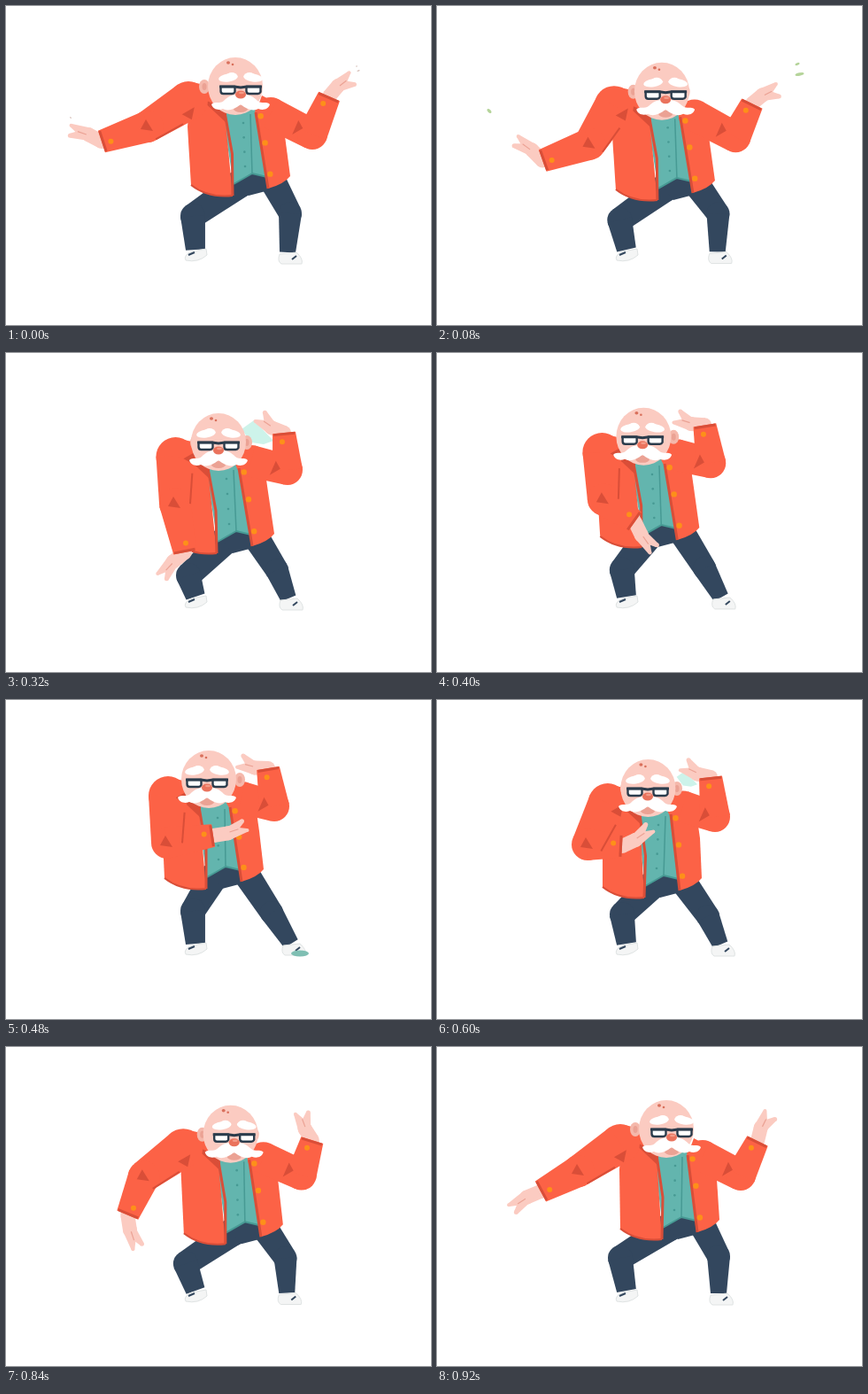
These frames come from a looping animation (480 px wide and 360 px high, 0.96 s). An HTML page with a canvas:

```html
<!DOCTYPE html>
<html lang="en">
<head>
<meta charset="utf-8">
<title>Dancing man</title>
<style>
html, body { margin: 0; width: 100%; height: 100%; overflow: hidden; background: #fff; }
canvas { display: block; }
</style>
</head>
<body>
<canvas id="stage" width="480" height="360"></canvas>
<script>
const ctx = document.getElementById('stage').getContext('2d');
const LOOP = 960, STEP = 40;
const KEY_TIMES = [0, 160, 320, 480, 600, 760, 920];
const RED = '#fc6246', DARK_RED = '#d94e38', SKIN = '#fbcbc1', BLUSH = '#eba294';
const VEST = '#63b5ae', DARK_VEST = '#479a94', NAVY = '#33475e', BUTTON = '#fd9019';

// Pose of each joint at every key time
const tracks = {
  face: [[265, 108], [251, 119], [240, 118], [227, 107], [238, 117], [250, 120], [265, 110]],
  turn: [[1], [.1], [-.5], [-1], [-.6], [0], [1]],
  collar: [[247, 120], [233, 130], [228, 130], [218, 121], [229, 129], [232, 131], [248, 122]],
  hem: [[256, 214], [242, 224], [238, 226], [226, 213], [234, 223], [242, 226], [254, 217]],
  elbowL: [[160, 136], [184, 173], [191, 170], [182, 161], [170, 163], [154, 152], [160, 140]],
  cuffL: [[108, 153], [138, 198], [202, 225], [234, 153], [209, 165], [159, 206], [117, 163]],
  aimL: [[208], [221], [142], [-9], [-25], [20], [157]],
  elbowR: [[346, 145], [328, 149], [318, 132], [303, 120], [314, 132], [325, 143], [343, 145]],
  cuffR: [[365, 102], [344, 115], [314, 90], [296, 77], [309, 87], [330, 102], [362, 106]],
  aimR: [[-50], [-48], [-158], [-178], [-167], [-159], [-76]],
  kneeL: [[211, 237], [202, 246], [206, 251], [211, 238], [209, 242], [201, 249], [207, 238]],
  kneeR: [[321, 234], [313, 236], [306, 245], [300, 240], [306, 244], [313, 240], [318, 236]],
  footR: [[318, 278], [316, 277], [319, 277], [322, 275], [320, 276], [317, 277], [318, 278]]
};

// Smooth periodic spline through the key poses
function sample(keys, t) {
  const n = keys.length;
  const time = i => KEY_TIMES[(i + n) % n] + LOOP * Math.floor(i / n);
  const key = i => keys[(i + n) % n];
  let i = n - 1;
  while (KEY_TIMES[i] > t) i--;
  const span = time(i + 1) - time(i), u = (t - time(i)) / span;
  return key(i).map((a, k) => {
    const b = key(i + 1)[k];
    const slope = j => (key(j + 1)[k] - key(j - 1)[k]) / (time(j + 1) - time(j - 1)) * span;
    return a + u * (slope(i) + u * (3 * (b - a) - 2 * slope(i) - slope(i + 1)
      + u * (2 * (a - b) + slope(i) + slope(i + 1))));
  });
}

const add = (p, x, y) => [p[0] + x, p[1] + y];
const mix = (a, b, u) => [a[0] + (b[0] - a[0]) * u, a[1] + (b[1] - a[1]) * u];
const polar = (p, deg, r) => add(p, r * Math.cos(deg * Math.PI / 180), r * Math.sin(deg * Math.PI / 180));
const heading = (a, b) => Math.atan2(b[1] - a[1], b[0] - a[0]) * 180 / Math.PI;

function fill(color, path) {
  ctx.fillStyle = color;
  ctx.fill(new Path2D(path));
}
function stroke(color, width, path) {
  ctx.strokeStyle = color;
  ctx.lineWidth = width;
  ctx.stroke(new Path2D(path));
}
function oval(color, p, rx, ry = rx, angle = 0) {
  ctx.fillStyle = color;
  ctx.beginPath();
  ctx.ellipse(p[0], p[1], rx, ry, angle, 0, 7);
  ctx.fill();
}
const poly = (color, ...points) => fill(color, 'M' + points.join('L') + 'Z');
const line = (color, width, ...points) => stroke(color, width, 'M' + points.join('L'));

// Tapered segments with round joints
function limb(color, points, radii, roundEnd) {
  points.forEach((p, i) => {
    const last = i === points.length - 1;
    if (!last || roundEnd) oval(color, p, radii[i]);
    if (last) return;
    const q = points[i + 1], side = heading(p, q) + 90;
    poly(color, polar(p, side, radii[i]), polar(q, side, radii[i + 1]),
      polar(q, side, -radii[i + 1]), polar(p, side, -radii[i]));
  });
}

function hand(wrist, aim, length, spread) {
  const palm = polar(wrist, aim, length * .42);
  limb(SKIN, [palm, polar(palm, aim + spread, length * .5)], [7, 2.5], true);
  limb(SKIN, [wrist, palm, polar(wrist, aim, length - 2)], [8, 8, 2], true);
  line(BLUSH, 1.2, polar(palm, aim + spread, 2), polar(palm, aim + spread * .4, length * .3));
}

function sleeve(shoulder, elbow, cuff, radii) {
  limb(RED, [shoulder, elbow, cuff], radii);
  const along = heading(elbow, cuff);
  const edge = polar(cuff, along, -1.5);
  line(DARK_RED, 3, polar(edge, along + 90, 12), polar(edge, along - 90, 12));
  oval(BUTTON, polar(polar(cuff, along, -10), along - 90, 3), 3);
}

function legs(p) {
  const hemR = add(p.hem, 40, -8);
  limb(NAVY, [add(hemR, 5, -9), p.kneeR, p.footR], [15, 13, 9]);
  limb(NAVY, [add(p.hem, 9, -14), p.kneeL, [214, 275]], [16, 14, 11]);
  poly(NAVY, add(p.hem, 0, -22), add(hemR, 0, -20), add(hemR, 1, 2), add(p.hem, 18, 0));
  const left = 'M226 274L210 277Q200 281 203 287Q217 290 227 281Z';
  fill('#f4f5f5', left);
  stroke('#dfe3e3', 1, left);
  line(NAVY, 2, [206, 281], [213, 278]);
  ctx.save();
  ctx.translate(p.footR[0] - 318, p.footR[1] - 278);
  const right = 'M309 280L328 278Q336 285 334 291L311 291Q306 288 309 280Z';
  fill('#f4f5f5', right);
  stroke('#dfe3e3', 1, right);
  line(NAVY, 2, [323, 286], [328, 282]);
  ctx.restore();
}

function torso(p) {
  const { collar, hem } = p;
  const collarR = add(collar, 35, 0), hemR = add(hem, 40, -8);
  const notch = add(hem, 22, -25);
  poly(VEST, add(collar, -4, -8), add(collarR, 4, -8), add(hemR, -1, -13), notch, add(hem, 1, -13));
  line(DARK_VEST, 1.5, add(collar, 29, 2), notch);
  line(DARK_VEST, 2, add(hem, 1, -13), notch, add(hemR, -1, -13));
  for (let i = 0; i < 4; i++) oval(DARK_VEST, mix(add(collar, 21, 12), add(notch, -8, -8), i / 3), 1.3);

  const outerL = add(hem, -47, -12);
  fill(RED, `M${collar}L${add(collar, -8, -28)}L${add(collar, -37, -34)}L${add(collar, -42, 16)}
    L${outerL}Q${add(hem, -28, 3)} ${hem}Z`);
  poly(DARK_RED, add(collar, -28, -16), add(collar, 2, -4), add(collar, 2, 12));
  line(DARK_RED, 3, collar, mix(add(collar, 6, 0), add(hem, 2, 0), .5), hem);
  stroke(DARK_RED, 2, `M${outerL}Q${add(hem, -28, 3)} ${hem}`);

  const outerR = add(hem, 65, -22);
  fill(RED, `M${collarR}L${add(collarR, 7, -19)}L${add(collarR, 28, -8)}L${add(collarR, 33, 27)}
    L${outerR}Q${add(hem, 58, -13)} ${hemR}Z`);
}

function arms(p) {
  const collarR = add(p.collar, 35, 0), hemR = add(p.hem, 40, -8);
  const shoulderR = add(p.collar, 50 + 2 * p.turn, -5 + 6 * p.turn);
  hand(p.cuffR, p.aimR, 37, 45);
  sleeve(shoulderR, p.elbowR, p.cuffR, [18, 17, 13]);
  const crease = mix(p.elbowR, shoulderR, .42);
  poly(DARK_RED, add(crease, -3, 10), add(crease, 4, -6), add(crease, 9, 3));
  line(DARK_RED, 3, collarR, hemR);
  for (const u of [.05, .4, .81]) oval(BUTTON, add(mix(collarR, hemR, u), 5, 0), 3.2);

  const shoulderL = add(p.collar, -38 - 3 * p.turn, -13);
  hand(p.cuffL, p.aimL, 41, -32);
  sleeve(shoulderL, p.elbowL, p.cuffL, [22, 18, 13]);
  const side = heading(shoulderL, p.elbowL) - 90;
  line(DARK_RED, 2, polar(mix(shoulderL, p.elbowL, .35), side, 19), polar(p.elbowL, side, 17));
  const pit = polar(mix(shoulderL, p.elbowL, .15), side, 20);
  poly(DARK_RED, pit, add(pit, 3, -14), add(pit, -11, -6));
  poly(DARK_RED, add(p.elbowL, -8, 3), add(p.elbowL, -2, -8), add(p.elbowL, 6, 5));
}

function head(p) {
  ctx.save();
  ctx.translate(...p.face);
  const cx = -2 - 4 * p.turn;
  for (const side of [-1, 1]) {
    const ear = [cx + side * 29 - 6 * p.turn, -17];
    oval('#f5b8ab', ear, 6, 8);
    oval(BLUSH, ear, 2.5, 4);
  }
  oval(SKIN, [cx, -17.5], 31, 32.5);
  oval('#d9705c', [cx - 8, -44], 2, 1.7);
  oval('#d9705c', [cx - 3, -42], 1.3);
  oval(BLUSH, [0, 8], 8, 4);
  for (const side of [-1, 1]) {
    oval('#fff', [side * 14, -27], 11, 4.5, side * .15);
    oval('#fff', [side * 10, -29], 6, 4);
    const x = side * 14.5 - 8;
    fill('#fff', `M${x} -17h16v7q-8 3 -16 0z`);
    stroke('#2b3c4c', 2.4, `M${x} -17h16v6q-1 2 -3 2h-10q-3 0 -3 -3z`);
  }
  line('#2b3c4c', 3, [-24, -17], [-7, -17], [0, -16], [7, -17], [24, -17]);
  fill('#fff', `M0 -7C-8 -9 -14 -6 -19 -1C-24 3 -29 -1 -33 3C-31 9 -25 10 -20 8C-15 11 -7 9 0 3
    C7 9 15 11 20 8C25 10 31 9 33 3C29 -1 24 3 19 -1C14 -6 8 -9 0 -7Z`);
  oval('#ea735d', [0, -8], 6, 4.5);
  oval('#f49c89', [1, -10], 3, 1.3);
  ctx.restore();
}

function accents(p, t) {
  // Bits flicked off both fingertips
  if (t <= 200) {
    const u = Math.min(1, t / 160), size = t > 160 ? .5 : .2 + .8 * u;
    const color = t ? '#b5d49a' : '#c9aaa0';
    oval(color, [73 - 28 * u, 126 - 15 * u], 5 * size, 2.8 * size, .8);
    oval(color, [396 + 22 * u, 68 - 5 * u], 4.5 * size, 2.3 * size, -.4);
    oval(color, [398 + 23 * u, 73 + 8 * u], 8.5 * size, 2.8 * size, -.2);
  }
  // Pale flash between head and raised hand
  const flash = t >= 280 && t <= 360 ? 1 : t >= 600 && t < 640 ? .65 : 0;
  if (flash) {
    const c = add(p.face, 45, -27);
    poly('#cdf3ea', add(c, -19 * flash, -5 * flash), add(c, -5 * flash, -15 * flash),
      add(c, 17 * flash, 8 * flash), add(c, 6 * flash, 12 * flash), add(c, -8 * flash, 10 * flash));
  }
}

function draw(t) {
  const pose = {};
  for (const name in tracks) {
    const value = sample(tracks[name], t);
    pose[name] = value.length > 1 ? value : value[0];
  }
  ctx.fillStyle = '#fff';
  ctx.fillRect(0, 0, 480, 360);
  ctx.lineJoin = 'round';
  accents(pose, t);
  legs(pose);
  if (t >= 440 && t <= 520) oval('#7fbfb3', add(pose.footR, 10, 11), 10, 3.5);
  torso(pose);
  arms(pose);
  head(pose);
}

function tick() {
  draw(Math.floor(performance.now() % LOOP / STEP) * STEP);
  requestAnimationFrame(tick);
}
tick();
</script>
</body>
</html>
```
